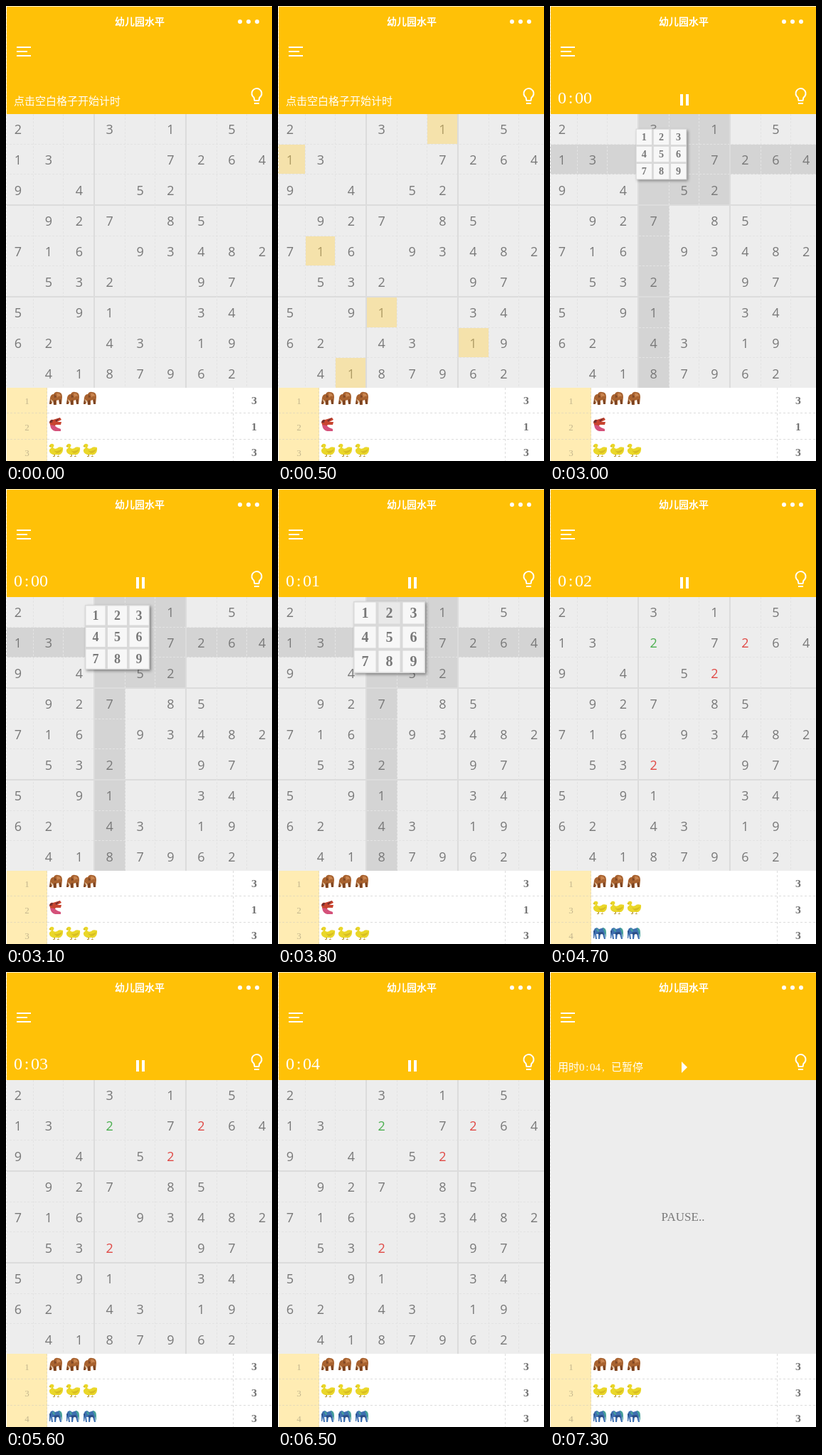
Recreate the animation shown at these times as an HTML page with a canvas. Size 374 by 640 pixels, loop 8 s.

```html
<!DOCTYPE html>
<html lang="zh">
<head>
<meta charset="utf-8">
<title>数独</title>
<style>
html, body { margin: 0; width: 100%; height: 100%; overflow: hidden; background: #fff; }
canvas { display: block; }
</style>
</head>
<body>
<canvas id="stage" width="374" height="640"></canvas>
<script>
const ctx = document.getElementById('stage').getContext('2d');
const LOOP = 8000;
const AMBER = '#ffc107', GRID_BG = '#ededed', LINE = '#e3e3e3', DIGIT = '#787878';
const SERIF = '"Liberation Serif", serif';
const CJK = '"Noto Sans CJK SC", "Noto Sans CJK", sans-serif';
const SANS = '"Open Sans", "Noto Sans", sans-serif';

const PUZZLE = [
  '200301050', '130007264', '904052000',
  '092708500', '716093482', '053200970',
  '509100340', '620430190', '041879620'
];
const PICK = { row: 1, col: 3, value: '2' };
const CLASHES = ['1,6', '2,5', '5,3'];

// Animals are drawn in a 20 x 20 box: [fill, path] layers
const ANIMALS = {
  mammoth: [
    ['#a8622f', 'M1 18L2 9Q3 4 7 4Q9 0 13 1Q19 1 19 8L18 18H15L14 12L11 13L11 19H7L6 13L4 18Z'],
    ['#7b4423', 'M7 13L10 12V19H7ZM15 12L17 11L18 18H15ZM2 13L4 12L3 18H1ZM8 4L11 8L8 9Z'],
    ['#c98550', 'M11 3Q16 2 17 7Q13 6 12 9Z'],
    ['#f1d9b5', 'M3 11L6 14L4 15Z']
  ],
  bird: [
    ['#c8442f', 'M1 7Q2 2 6 3L16 0L18 3L12 6L18 6L17 10L10 10L8 13L3 12Z'],
    ['#d4517a', 'M2 10L8 11L12 14L17 16L17 19L9 19Q3 18 2 10Z'],
    ['#75302e', 'M1 7Q2 3 6 3L5 7ZM9 4L16 0L11 6Z']
  ],
  goose: [
    ['#ead729', 'M1 4Q2 0 6 1Q9 3 6 6Q8 9 12 7Q14 4 20 6Q21 13 16 16H6Q0 14 1 9L4 6Z'],
    ['#d8bd22', 'M7 10Q12 13 19 8Q17 14 11 14ZM0 4L3 3L3 6Z'],
    ['#b3922a', 'M7 16H9V18H6V19H9ZM13 16H14V18H12V19H15Z']
  ],
  horse: [
    ['#3d6fb0', 'M1 7L3 3L6 2L9 4L15 2L18 6L17 11L18 18H16L14 11H11L10 18H8V11L5 11L6 18H4L3 11L2 17H1Z'],
    ['#47a09a', 'M14 2Q19 2 19 9V17L17 10ZM5 3L8 4L9 8L6 7Z'],
    ['#2b4d83', 'M7 9L14 8L16 12L13 11L9 12ZM1 7L3 6L3 11Z']
  ]
};
for (const layers of Object.values(ANIMALS))
  for (const layer of layers) layer[1] = new Path2D(layer[1]);

const LIST_BEFORE = [['1', 'mammoth', 3], ['2', 'bird', 1], ['3', 'goose', 3]];
const LIST_AFTER = [['1', 'mammoth', 3], ['3', 'goose', 3], ['4', 'horse', 3]];

// Blocks repeat every 129 px; three cells share 128 px of each
const third = k => Math.round(128 / 3 * k);
const edge = i => 129 * Math.floor(i / 3) + third(i % 3);
const cellSize = i => third(i % 3 + 1) - third(i % 3) - 1;
const colX = c => edge(c) - 4;
const rowY = r => edge(r) + 152;
const colMid = c => 17 + 42.9 * c;
const rowMid = r => 174 + 43 * r;

function rect(x, y, w, h, fill) {
  ctx.fillStyle = fill;
  ctx.fillRect(x, y, w, h);
}

function text(str, x, y, font, fill, align = 'center') {
  ctx.font = font;
  ctx.fillStyle = fill;
  ctx.textAlign = align;
  ctx.textBaseline = 'alphabetic';
  ctx.fillText(str, x, y);
}

// Evenly spaced characters, each centred in its own step
function spaced(str, x, y, step, font, fill) {
  [...str].forEach((ch, i) => text(ch, x + step * (i + 0.5), y, font, fill));
}

function line(x1, y1, x2, y2, color, width = 1, dash = []) {
  ctx.strokeStyle = color;
  ctx.lineWidth = width;
  ctx.setLineDash(dash);
  ctx.beginPath();
  ctx.moveTo(x1, y1);
  ctx.lineTo(x2, y2);
  ctx.stroke();
  ctx.setLineDash([]);
}

function disc(x, y, r) {
  ctx.beginPath();
  ctx.arc(x, y, r, 0, 7);
  ctx.fill();
}

function bulb() {
  ctx.strokeStyle = '#fff';
  ctx.lineWidth = 2;
  ctx.lineJoin = 'round';
  ctx.beginPath();
  ctx.arc(352.5, 123, 7, Math.PI * 0.69, Math.PI * 0.31);
  ctx.lineTo(355.5, 133);
  ctx.lineTo(349.5, 133);
  ctx.closePath();
  ctx.stroke();
  rect(349, 136, 7, 2, '#fff');
}

function header(t) {
  rect(0, 0, 374, 152, '#fdf3d3');
  rect(1, 1, 373, 151, AMBER);
  text('幼儿园水平', 188, 27, `bold 14px ${CJK}`, '#fff');
  ctx.fillStyle = '#fff';
  for (const x of [329, 341, 353]) disc(x, 22, 3);
  rect(15, 57, 20, 2, '#fff');
  rect(15, 63, 15, 2, '#fff');
  rect(15, 69, 20, 2, '#fff');
  bulb();

  const note = `300 15px ${CJK}`, small = `15px ${SERIF}`;
  const clock = '0:0' + (t < 3800 ? 0 : t < 4700 ? 1 : t < 5600 ? 2 : t < 6500 ? 3 : 4);
  if (t < 3000) {
    text('点击空白格子开始计时', 11, 139, note, '#fff', 'left');
  } else if (t < 7300) {
    spaced(clock, 11, 137, 12, `24px ${SERIF}`, '#fff');
    rect(183, 124, 4, 16, '#fff');
    rect(191, 124, 4, 16, '#fff');
  } else {
    text('用时', 11, 139, note, '#fff', 'left');
    spaced(clock + ',', 41, 139, 7.5, small, '#fff');
    text('已暂停', 86, 139, note, '#fff', 'left');
    ctx.fillStyle = '#fff';
    ctx.fill(new Path2D('M185 126L193 134L185 142Z'));
  }
}

function inReach(r, c) {
  return r === PICK.row || c === PICK.col || (r < 3 && c > 2 && c < 6);
}

function board(t) {
  rect(0, 152, 374, 385, GRID_BG);
  if (t >= 7300) {
    text('PAUSE..', 187, 350, `17px ${SERIF}`, DIGIT);
    return;
  }
  const picking = t >= 3000 && t < 3900, placed = t >= 3900;
  const eachCell = fn => {
    for (let r = 0; r < 9; r++)
      for (let c = 0; c < 9; c++)
        fn(r, c, colX(c), rowY(r), cellSize(c), cellSize(r));
  };

  if (picking) eachCell((r, c, x, y, w, h) => {
    if (inReach(r, c)) rect(x, y, w + 1, h + (r < 8), '#d4d4d4');
  });
  for (let i = 1; i < 9; i++) {
    const thick = i % 3 === 0;
    const color = thick ? '#dcdcdc' : LINE, width = thick ? 2 : 1, dash = thick ? [] : [3, 2];
    const x = colX(i) - width / 2, y = rowY(i) - width / 2;
    line(x, 152, x, 537, color, width, dash);
    line(0, y, 374, y, color, width, dash);
  }
  eachCell((r, c, x, y, w, h) => {
    let digit = PUZZLE[r][c], color = DIGIT;
    if (placed && r === PICK.row && c === PICK.col) {
      digit = PICK.value;
      color = '#4caf50';
    } else if (placed && CLASHES.includes(r + ',' + c)) {
      color = '#e04a46';
    }
    if (digit === '0') return;
    text(digit, colMid(c), rowMid(r) + 6, `18px ${SANS}`, color);
    if (digit === '1' && t >= 500 && t < 3000)
      rect(x, y, w, h, 'rgba(255,208,70,.4)');
  });
}

function popupScale(t) {
  const steps = [[3000, 0.71], [3100, 0.9], [3200, 1], [3900, 0.87], [4000, 0.71], [4100, 0]];
  return steps.reduce((s, [at, value]) => t >= at ? value : s, 0);
}

function popup(t) {
  const s = popupScale(t);
  if (!s) return;
  ctx.save();
  ctx.translate(156.5, 208.5);
  ctx.scale(s, s);
  ctx.globalAlpha = t < 3900 ? 1 : s - 0.2;
  ctx.shadowColor = 'rgba(0,0,0,.4)';
  ctx.shadowBlur = 4;
  ctx.shadowOffsetX = ctx.shadowOffsetY = 2;
  rect(-50.5, -50.5, 101, 101, '#d9d9d9');
  ctx.shadowColor = 'transparent';
  for (let i = 0; i < 9; i++) {
    const x = (i % 3 - 1) * 34, y = (Math.floor(i / 3) - 1) * 34;
    const pressed = t >= 3800 && String(i + 1) === PICK.value;
    rect(x - 15, y - 15, 30, 30, pressed ? '#e9e9e9' : '#f7f7f7');
    text(i + 1, x, y + 6.5, `bold 20px ${SERIF}`, DIGIT);
  }
  ctx.restore();
}

function animal(name, x, y) {
  ctx.save();
  ctx.translate(x, y);
  for (const [fill, path] of ANIMALS[name]) {
    ctx.fillStyle = fill;
    ctx.fill(path);
  }
  ctx.restore();
}

function list(t) {
  rect(0, 537, 374, 103, '#fff');
  rect(1, 537, 57, 103, '#ffecb3');
  line(57.5, 537, 57.5, 640, '#e8dcb8', 1, [3, 2]);
  line(319.5, 537, 319.5, 640, '#dcdcdc', 1, [3, 3]);
  for (const y of [572.5, 609.5]) {
    line(1, y, 57, y, '#e8dcb8', 1, [3, 2]);
    line(58, y, 374, y, '#dcdcdc', 1, [3, 3]);
  }
  (t < 3900 ? LIST_BEFORE : LIST_AFTER).forEach(([index, name, count], i) => {
    const mid = 555 + Math.round(36.5 * i);
    text(index, 29.5, mid + 5, `13px ${SERIF}`, '#c4b68e');
    for (let k = 0; k < count; k++) animal(name, 60 + 24 * k, mid - 13);
    text(count, 349, mid + 5, 'bold 12px "DejaVu Serif", serif', '#757575');
  });
  if (t >= 3900 && t < 4500) {
    const alpha = t < 4300 ? 0.4 : t < 4400 ? 0.27 : 0.13;
    ctx.fillStyle = `rgba(0,0,0,${alpha})`;
    ctx.beginPath();
    ctx.roundRect(369, 538, 4, 39, 2);
    ctx.fill();
  }
}

function draw(t) {
  header(t);
  board(t);
  list(t);
  line(0.5, 0, 0.5, 640, '#fff', 1, [3, 2]);
  popup(t);
}

const start = performance.now();
function tick() {
  draw((performance.now() - start) % LOOP);
  requestAnimationFrame(tick);
}
tick();
</script>
</body>
</html>
```
